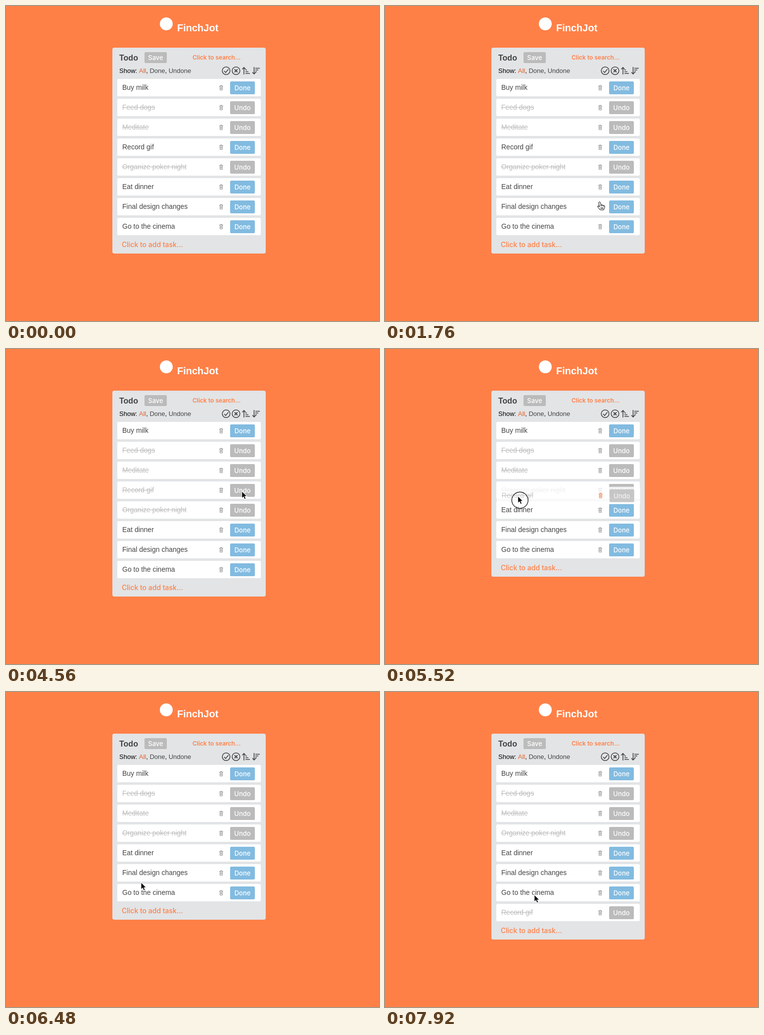
Recreate the animation shown at these times as an HTML page with a canvas. Size 754x635 px, loop 8000 ms.

```html
<!DOCTYPE html>
<html lang="en">
<head>
<meta charset="utf-8">
<title>Todo list</title>
<style>
html, body { margin: 0; height: 100%; overflow: hidden; background: #ff8047; }
canvas { display: block; }
</style>
</head>
<body>
<canvas id="stage" width="754" height="635"></canvas>
<script>
const ctx = document.getElementById('stage').getContext('2d');
const LOOP = 8000, STEP = 80;
const ORANGE = '#ff8047', DARK = '#444', GREY = '#bbb', BLUE = '#82bbe0';
const SANS = '"Liberation Sans", Arial, sans-serif';
const UI = 'Inter, sans-serif';

// Moments when the state of the list changes
const CLICK = [3360, 3520], TOGGLED = 4560, PRESSED = 5440, LIFTED = 5520,
      RELEASED = 6480, DROPPED = 6880;
const HAND = [1680, 2080];
const GRAB = [268, 286];

// time, x, y of the pointer tip
const pointerPath = [
  [0, 513, 636], [560, 498, 558], [720, 498, 558], [1120, 497, 541], [1200, 497, 541],
  [1760, 434, 395], [2080, 431, 397], [2640, 460, 280], [2960, 477, 287], [4880, 477, 287],
  [5440, 268, 286], [5760, 273, 355], [6320, 273, 384], [6400, 273, 384], [7920, 302, 409]
];

const task = (text, done = false) => ({ text, done });
const tasks = [
  task('Buy milk'), task('Feed dogs', true), task('Meditate', true), task('Record gif'),
  task('Organize poker night', true), task('Eat dinner'),
  task('Final design changes'), task('Go to the cinema')
];
const moving = tasks[3];
const others = tasks.filter(item => item !== moving);

const within = (t, [from, to]) => t >= from && t < to;

function pointerAt(t) {
  const next = pointerPath.findIndex(p => p[0] > t);
  if (next < 0) return pointerPath.at(-1).slice(1);
  const [t0, x0, y0] = pointerPath[next - 1], [t1, x1, y1] = pointerPath[next];
  const u = (t - t0) / (t1 - t0), k = u * u * (3 - 2 * u);
  return [x0 + (x1 - x0) * k, y0 + (y1 - y0) * k];
}

function box(x, y, w, h, r, color) {
  ctx.fillStyle = color;
  ctx.beginPath();
  ctx.roundRect(x, y, w, h, r);
  ctx.fill();
}

function label(text, x, y, font, color, align = 'left') {
  ctx.font = font;
  ctx.fillStyle = color;
  ctx.textAlign = align;
  ctx.fillText(text, x, y);
  return ctx.measureText(text).width;
}

function line(d, color, width, fill) {
  const path = new Path2D(d);
  ctx.lineWidth = width;
  ctx.strokeStyle = color;
  if (fill) {
    ctx.fillStyle = fill;
    ctx.fill(path);
  }
  ctx.stroke(path);
}

function ring(x, y, r, color, width) {
  ctx.lineWidth = width;
  ctx.strokeStyle = color;
  ctx.beginPath();
  ctx.arc(x, y, r, 0, 7);
  ctx.stroke();
}

function at(x, y, draw) {
  ctx.save();
  ctx.translate(x, y);
  draw();
  ctx.restore();
}

function button(text, x, y, w, h, color) {
  box(x, y, w, h, 2.5, color);
  label(text, x + w / 2, y + h / 2 + 5, `500 13px ${UI}`, '#fff', 'center');
}

function row({ text, done }, x, y, trashColor = '#999') {
  at(x, y, () => {
    box(0, 0, 290, 35, 2.5, '#fff');
    const width = label(text, 10, 22, `14px ${SANS}`, done ? GREY : DARK);
    if (done) ctx.fillRect(10, 17, width, 1);
    line('M206 14.5H214M208.5 14V13H211.5V14M207.5 15V22.5H212.5V15M209.2 16V21M210.8 16V21', trashColor, 1);
    button(done ? 'Undo' : 'Done', 228, 5, 50, 26, done ? GREY : BLUE);
  });
}

function header() {
  ctx.fillStyle = '#fff';
  ctx.beginPath();
  ctx.arc(324, 36, 13, 0, 7);
  ctx.fill();
  label('FinchJot', 346, 51, `bold 20px ${SANS}`, '#fff');
}

function toolbar() {
  label('Todo', 229, 110, `bold 16px ${SANS}`, DARK);
  button('Save', 280, 93, 45, 22, GREY);
  label('Click to search...', 377, 108, `600 12px ${UI}`, ORANGE);
  let x = 229;
  for (const [text, color] of [['Show: ', '#000'], ['All', '#e5622b'], [', ', '#000'],
                               ['Done', DARK], [', ', '#000'], ['Undone', DARK]])
    x += label(text, x, 135, `13px ${SANS}`, color);

  ring(445, 130.5, 7.8, DARK, 1.6);
  line('M441 131L444 134L449.5 127.5', DARK, 1.6);
  ring(465, 130.5, 7.8, DARK, 1.6);
  line('M462 127.5L468 133.5M468 127.5L462 133.5', DARK, 1.8);
  line('M481 138V124M477.5 127.5L481 124L484.5 127.5M484 129H487M484 132.5H490M484 136H493', DARK, 1.6);
  line('M501.5 123V137M498 133.5L501.5 137L505 133.5M504 125.5H513M504 129H510M504 132.5H507', DARK, 1.6);
}

function arrow() {
  line('M0 0V13.5L3.1 10.7L5.3 15.8L7.6 14.8L5.4 9.9H9.6Z', '#fff', 1.6);
  line('M0.6 1.4V12.3L3.4 9.7L5.7 15L6.9 14.5L4.6 9.2H8.4Z', '#000', 0.6, '#000');
}

function hand() {
  line('M-2 1Q0 -2 1.5 1L2.5 6Q4 4 5 6.5Q7 5 7.8 7.5Q10 6.5 10 9V11.5L8 16H1L-4 10Q-5 7.5 -2.5 8.5L-.5 10Z' +
       'M2.5 6V9M5 6.5V9M7.8 7.5V9.5M2.5 11V14M4.5 11V14M6.5 11V14', '#000', 1, '#fff');
}

function render(t) {
  moving.done = t >= TOGGLED;
  const list = t < LIFTED ? tasks : t < DROPPED ? others : [...others, moving];
  const [x, y] = pointerAt(t);
  const bottom = 179 + list.length * 40;

  ctx.fillStyle = ORANGE;
  ctx.fillRect(0, 0, 754, 635);
  header();
  box(215, 84, 310, bottom - 84, 4, '#e2e4e6');
  toolbar();
  list.forEach((item, i) => row(item, 225, 147 + i * 40));
  label('Click to add task...', 234, bottom - 13, `500 14px ${UI}`, ORANGE);

  if (within(t, [LIFTED, RELEASED])) {
    ctx.globalAlpha = 0.8;
    row(moving, 225 + x - GRAB[0], 267 + y - GRAB[1], '#e5622b');
    ctx.globalAlpha = 1;
  }
  if (within(t, CLICK) || within(t, [PRESSED, RELEASED])) ring(x + 4, y + 8, 16.5, '#000', 1.2);
  if (t > 0) at(x, y, within(t, HAND) ? hand : arrow);
}

function tick() {
  const t = performance.now() % LOOP;
  render(Math.floor(t / STEP) * STEP);
  requestAnimationFrame(tick);
}
tick();
</script>
</body>
</html>
```
